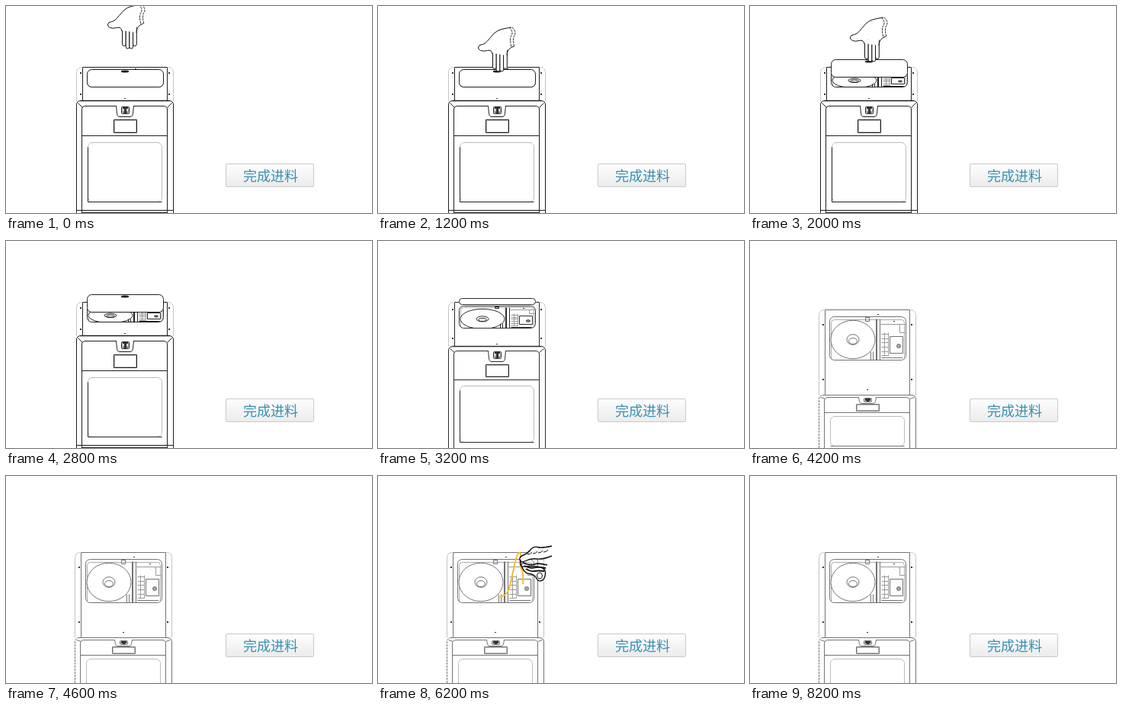
Animation, 480 px wide and 272 px high, one loop 8.4 s. Source, as an HTML page with a canvas:

```html
<!DOCTYPE html>
<html lang="zh">
<head>
<meta charset="utf-8">
<style>
  html, body { margin: 0; width: 100%; height: 100%; overflow: hidden; background: #fff; }
  canvas { position: absolute; left: 0; top: 0; }
  .button {
    position: absolute; left: 288px; top: 207px; width: 116px; height: 31px;
    box-sizing: border-box; padding-left: 2px;
    border: 1px solid #c9c9c9; border-radius: 2px;
    background: linear-gradient(#fdfdfd, #ececec);
    font: 300 18px/29px "Noto Sans CJK SC", "Noto Sans CJK", sans-serif;
    color: #3690b3; text-align: center; white-space: nowrap;
  }
</style>
</head>
<body>
<canvas width="480" height="272"></canvas>
<div class="button">完成进料</div>
<script>
const LOOP = 8400, STEP = 200;
const g = document.querySelector('canvas').getContext('2d');

const ramp = (t, from, to) => Math.min(1, Math.max(0, (t - from) / (to - from)));
const grey = v => `rgb(${v},${v},${v})`;

function pen(color, width = 1, dash = []) {
  g.strokeStyle = color;
  g.lineWidth = width;
  g.setLineDash(dash);
}

function paint(fill) {
  if (fill) { g.fillStyle = fill; g.fill(); }
  g.stroke();
}

function line(...p) {
  g.beginPath();
  for (let i = 0; i < p.length; i += 2) g.lineTo(p[i] + .5, p[i + 1] + .5);
  g.stroke();
}

function box(x1, y1, x2, y2, r = 0, fill) {
  g.beginPath();
  g.roundRect(x1 + .5, y1 + .5, x2 - x1, y2 - y1, r);
  paint(fill);
}

function oval(x, y, rx, ry, fill) {
  g.beginPath();
  g.ellipse(x, y, rx, ry, 0, 0, 7);
  paint(fill);
}

function dot(x, y, w = 2, h = 1) {
  g.fillStyle = '#333';
  g.fillRect(x, y, w, h);
}

// smooth stroke through a few points
function curve(p, fill) {
  const n = p.length;
  g.beginPath();
  g.moveTo(p[0], p[1]);
  for (let i = 2; i < n - 4; i += 2)
    g.quadraticCurveTo(p[i], p[i + 1], (p[i] + p[i + 2]) / 2, (p[i + 1] + p[i + 3]) / 2);
  g.quadraticCurveTo(p[n - 4], p[n - 3], p[n - 2], p[n - 1]);
  paint(fill);
}

// left or right side of a round-shouldered case
function side(x, dir, y, r, bottom) {
  g.beginPath();
  g.moveTo(x + .5, bottom);
  g.lineTo(x + .5, y + r);
  g.quadraticCurveTo(x + .5, y + .5, x + .5 + dir * r, y + .5);
  g.stroke();
}

// the machine is a tilted box: its lid side grows as its front shrinks
function camera(t) {
  const tilt = ramp(t, 3000, 4200);
  const angle = (20.3 + 41.6 * tilt) * Math.PI / 180;
  const top = Math.round(80 - ramp(t, 3000, 3600) + 21 * ramp(t, 3600, 4600) ** 1.3);
  const depth = 127 * Math.sin(angle), face = Math.cos(angle);
  const edge = Math.round(top + depth);
  return {
    tilt, top, depth, face, edge,
    deep: v => Math.round(top + v * depth),
    front: v => Math.round(edge + v * face)
  };
}

function inside(cam, ink) {
  const top = cam.deep(.08), bot = cam.deep(.59);
  const y = v => Math.round(top + v * (bot - top));
  const sy = cam.top + .34 * cam.depth + 3 * cam.face, sr = .225 * cam.depth;

  g.save();
  g.beginPath();
  g.roundRect(106, top, 100, bot - top, 6);
  g.clip();
  pen('#aaa');
  box(108, y(.07), 204, bot + 6, 4);
  pen(ink);
  oval(137, sy, 29, sr, '#fff');
  oval(137, sy, 8, sr * .27);
  oval(137, sy + sr * .08, 5.5, sr * .16);
  box(153, y(.02), 158, y(.1));

  // partition, feeder stack and motor
  for (const x of [167, 168, 172]) line(x, y(.06), x, bot);
  for (const x of [160, 163]) line(x, y(.8), x, bot);
  pen('#999');
  line(173, y(.17), 205, y(.17));
  line(198, y(.17), 198, y(.36), 205, y(.36));
  for (let v = .4; v < 1; v += .1) line(174, y(v), 183, y(v));
  for (const x of [178, 183]) line(x, y(.36), x, y(.9));
  pen(ink);
  box(185, y(.45), 202, y(.84));
  oval(197, y(.68), 2.5, sr * .1, '#aaa');
  line(174, y(.95), 202, y(.95));
  dot(190, y(.1));
  g.restore();
  pen(ink);
  box(106, top, 206, bot, 6);
}

function lid(t, ink) {
  const shut = ramp(t, 2800, 3400);
  const y = 83 - 13 * ramp(t, 1200, 2000) + 8 * shut, h = 23 * (1 - shut);
  if (h <= 0) return;
  pen(ink);
  box(106, Math.round(y), 206, Math.round(y + h), Math.min(6, h / 2), '#fff');
  if (!shut) oval(156, y + 3, 5, 1, '#111');
}

function latch(cam, ink) {
  const top = cam.front(7), bot = cam.front(22.5), r = 4 * cam.face;
  pen(ink);
  g.beginPath();
  g.moveTo(144.5, top);
  g.lineTo(145.5, bot - r);
  g.quadraticCurveTo(146, bot + .5, 149, bot + .5);
  g.lineTo(163, bot + .5);
  g.quadraticCurveTo(166, bot + .5, 166.5, bot - r);
  g.lineTo(167.5, top);
  paint('#fff');
  const h = Math.round((bot - top) * .65);
  box(151, top + 1, 161, top + 1 + h, 1, '#ccc');
  dot(153, top + 2, 7, 2);
  dot(155, top + 2, 3, h - 1);
  dot(153, top + h - 1, 7, 1);
}

function machine(t) {
  const cam = camera(t), { tilt, top, edge, front, deep } = cam;
  const ink = grey(Math.round(30 + 85 * tilt));
  const dots = [1, 1], tilted = tilt > .3;
  g.save();
  g.translate(Math.round(-2 * tilt), 0);

  // upper panel
  pen('#888', 1, dots);
  side(92, 1, top, 8, edge);
  side(219, -1, top, 8, edge);
  pen(ink);
  line(100, edge, 100, top, 211, top, 211, edge);
  for (const x of [97, 213])
    for (const v of [.18, .82]) dot(x, deep(v) - 1, 2, 2);
  dot(169, deep(.05));
  dot(155, deep(.94));
  inside(cam, ink);
  lid(t, ink);

  // lower body
  const ledge = front(7);
  pen(ink, 1, tilted ? [3, 1] : []);
  side(92, 1, edge, 6, 280);
  pen(ink);
  side(219, -1, edge, 6, 280);
  pen(ink, tilted ? 1 : 1.5);
  line(97, edge, 214, edge);
  pen(ink);
  side(99, 1, ledge, 5, 280);
  side(211, -1, ledge, 5, 280);
  line(103, ledge, 207, ledge);
  line(94, edge + 3, 100, ledge + 2);
  line(217, edge + 3, 211, ledge + 2);
  latch(cam, ink);

  pen(ink);
  box(141, front(26.5), 171, front(45));
  pen('#bbb');
  box(142, front(26.5) + 1, 170, front(45) - 1);
  pen(ink);
  line(99, front(49.5), 211, front(49.5));
  const door = front(58.5), floor = front(142);
  pen('#777', 1, dots);
  box(107, door, 204, floor, 6);
  pen(ink);
  if (!tilted) line(107, door + 6, 107, floor);
  line(107, floor, 204, floor);
  line(92, front(153.5), 219, front(153.5));
  line(99, front(157), 211, front(157));
  g.restore();
}

function pushHand(t) {
  if (t >= 2600) return;
  const down = 1 - ramp(t, 0, 1200);
  g.save();
  g.translate(2 * down, -30 * down - 13 * ramp(t, 1200, 2000) - 75 * ramp(t, 2000, 2600));
  pen('#111');
  for (let i = 0; i < 4; i++) {
    const x = 150 + 4.7 * i;
    box(x, 56, x + 4.7, 82 + 4 * Math.sin(i * Math.PI / 3), 2.3, '#fff');
  }
  curve([150, 63, 149, 57, 138, 60, 131, 57, 132, 51, 141, 50, 152, 35, 162, 30, 175, 28], '#fff');
  curve([151, 62, 168, 20, 178, 53, 169, 56, 169, 65].slice(4));
  g.fillStyle = '#fff';
  g.beginPath();
  for (const [x, y] of [[151, 62], [174, 30], [177, 52], [169, 57], [168, 65]]) g.lineTo(x, y);
  g.fill();
  pen('#222', 1, [3, 1]);
  for (const x of [0, 4]) curve([172 + x, 28, 178 + x, 34, 172 + x, 43, 175 + x, 54]);
  g.restore();
}

function pullHand(t) {
  if (t < 5200 || t >= 8200) return;
  const n = Math.floor((t - 6200) / 1000);
  const dx = 6 * Math.min(n, 0), dy = n < 0 ? -5 : 12 * n;
  pen('#f8bd2d', 2);
  curve([160, 159 - 2 * Math.max(n, 0), 169, 157, 174, 141, 182 + dx, 102 + dy,
    188 + dx, 100 + dy, 186 + dx, 120 + dy, 191 + dx, 126 + dy, 190 + dx, 142 + dy]);

  g.save();
  g.translate(dx, dy);
  pen('#111', 1.4);
  // index finger and back of the hand
  curve([228, 92, 215, 95, 204, 92, 196, 102, 185, 106, 187, 115, 200, 108, 216, 110, 228, 105], '#fff');
  // thumb and curled fingers
  curve([187, 110, 185, 120, 197, 118, 220, 120, 219, 136, 210, 139, 205, 129, 191, 128, 187, 115], '#fff');
  pen('#111', 1.8);
  for (let i = 0; i < 3; i++)
    curve([190 + 2 * i, 114 + 4 * i, 200, 118 + 4 * i, 210, 114 + 5 * i, 222 - 2 * i, 117 + 4 * i]);
  pen('#111');
  oval(212, 131, 3.5, 4, '#fff');
  for (let i = 0; i < 4; i++)
    curve([196 + 7 * i, 103 - i, 200 + 7 * i, 103 - i, 202 + 7 * i, 100 - i]);
  g.restore();
}

const start = performance.now();
function draw(now) {
  const t = Math.floor(Math.max(0, now - start) % LOOP / STEP) * STEP;
  g.fillStyle = '#fff';
  g.fillRect(0, 0, 480, 272);
  machine(t);
  pushHand(t);
  pullHand(t);
  requestAnimationFrame(draw);
}
draw(start);
</script>
</body>
</html>
```
